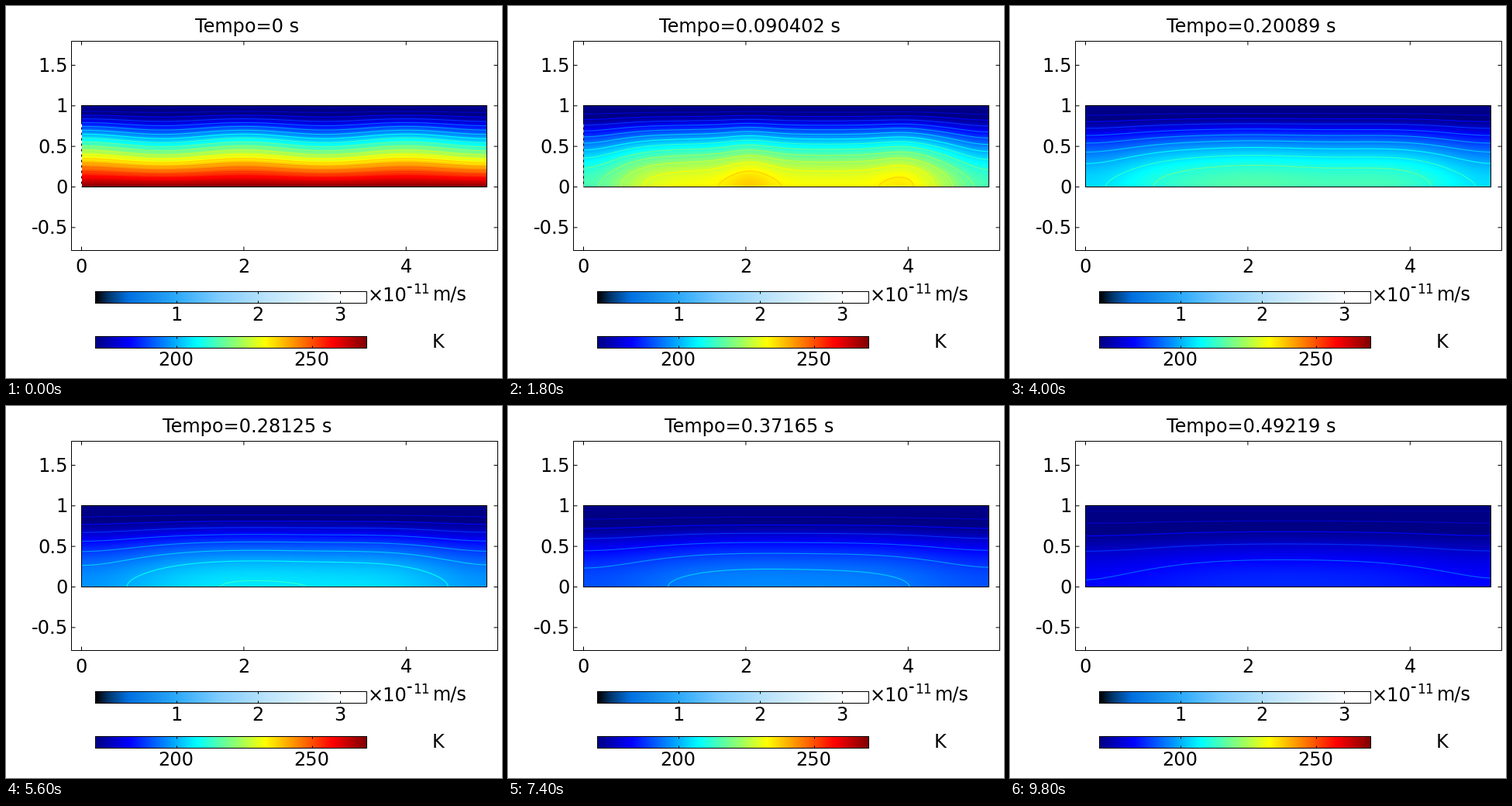
Animation of 640x480 px, one loop 10000 ms. Source, as a matplotlib script:

```python
import numpy as np
import matplotlib.pyplot as plt
from matplotlib.animation import FuncAnimation
from matplotlib.colors import LinearSegmentedColormap
from matplotlib.patches import Rectangle

FRAMES, INTERVAL = 50, 200
DT = 9 / 896                       # seconds of simulated time per frame
T_TOP, T_BOTTOM = 157.0, 270.0     # initial temperatures, K
C_MIN, C_MAX = 170.0, 270.0        # colour range of the surface
X0, Y0, SCALE = 97.5, 233.5, 104.7  # pixel position of the origin, px per unit
LENGTH = 5.0

rainbow = LinearSegmentedColormap.from_list("rainbow", [
    (0, (0, 0, 0.52)), (0.125, (0, 0, 1)), (0.375, (0, 1, 1)),
    (0.625, (1, 1, 0)), (0.875, (1, 0, 0)), (1, (0.5, 0, 0))], N=512)
aurora = LinearSegmentedColormap.from_list("aurora", [
    (0, "#000000"), (0.05, "#003870"), (0.12, "#0070e0"), (0.3, "#2caafa"),
    (0.45, "#7ccbff"), (0.62, "#b8e2fb"), (0.8, "#e6f5fd"), (0.92, "#ffffff"),
    (1, "#ffffff")], N=512)

plt.rcParams["font.family"] = "DejaVu Sans"
fig = plt.figure(figsize=(6.4, 4.8), dpi=100, facecolor="white")
ax = fig.add_axes([0, 0, 1, 1])
ax.axis("off")


def px(x):
    return X0 + SCALE * x


def py(y):
    return Y0 - SCALE * y


def label(x, y, text, ha="center", size=24, **kw):
    return ax.text(x, y, text, ha=ha, va="baseline", fontsize=size * 0.72,
                   color="black", **kw)


# Coordinates ending in .5 are pixel centres, so snapping stays off.
def line(xs, ys, width=0.72, color="black", **kw):
    return ax.plot(xs, ys, color=color, lw=width, snap=False,
                   solid_capstyle="butt", **kw)[0]


def box(left, top, right, bottom, zorder=4):
    ax.add_patch(Rectangle((left, top), right - left, bottom - top, fill=False,
                           ec="black", lw=0.72, snap=False, zorder=zorder))


def colorbar(top, cmap, ticks):
    ramp = np.linspace(0, 1, 350)[None, :]
    ax.imshow(ramp, cmap=cmap, extent=(115, 466, top + 15.5, top - 0.5),
              aspect="auto", interpolation="nearest")
    box(115.5, top, 465.5, top + 15)
    for x, text in ticks:
        line([x, x], [top, top + 3], zorder=5)
        line([x, x], [top + 12, top + 15], zorder=5)
        label(x - 0.8, top + 37.5, text)


# ---- temperature field ----
xs = np.linspace(0, LENGTH, 525)
ys = np.linspace(1, 0, 106)
gx, gy = np.meshgrid(xs, ys)
odd = 2 * np.arange(40) + 1
modes = np.cos(np.outer(ys, odd) * np.pi / 2)
weights = 8 / (np.pi * odd) ** 2


def ease(u):
    u = min(max(u, 0.0), 1.0)
    return u * u * (3 - 2 * u)


def spread(center, s):
    return np.exp(-(xs - center) ** 2 / s)


def gain(t):
    """Change of the slowest vertical mode along x: cold ends, two warm spots."""
    ramp = ease(t / 0.08)
    g = 1 - 0.01 * ramp + 0.15 * t
    s = max(0.2, 2.6 * (t + 0.058))
    loss = ramp * 0.2574 / np.sqrt(np.pi * s)
    g = g - loss * (spread(0, s) + spread(LENGTH, s))
    s = max(0.11, 0.11 + 4 * (t - 0.0904))
    warm = ramp * np.sqrt(0.11 / s)
    return g + warm * (0.072 * spread(2.05, s) + 0.048 * spread(3.95, s))


def field(t):
    decay = weights * np.exp(-(odd * np.pi / 2) ** 2 * t)
    profile = modes @ decay
    u = profile[:, None] + decay[0] * np.outer(modes[:, 0], gain(t) - 1)
    u += (0.03 * np.exp(-2 * np.pi ** 2 * t)
          * np.cos(np.pi * gx) * np.sin(np.pi * gy))
    return T_TOP + (T_BOTTOM - T_TOP) * u


levels = T_TOP + (T_BOTTOM - T_TOP) * (np.arange(20) + 0.5) / 20

# ---- fixed parts ----
surface = ax.imshow(field(0), cmap=rainbow, vmin=C_MIN, vmax=C_MAX,
                    extent=(97, 621, 234, 128),
                    aspect="auto", interpolation="bilinear", zorder=1)
box(px(0), 128.5, 620.5, py(0))

L, R, TOP, BOTTOM = 84.5, 634.5, 45.5, 315.5
box(L, TOP, R, BOTTOM)
for v in (0, 2, 4):
    line([px(v)] * 2, [TOP, TOP + 5])
    line([px(v)] * 2, [BOTTOM - 5, BOTTOM])
    label(px(v), 344, str(v))
for v in (-0.5, 0, 0.5, 1, 1.5):
    line([L, L + 5], [py(v)] * 2)
    line([R - 5, R], [py(v)] * 2)
    label(80, py(v) + 8.5, f"{v:g}", ha="right")

colorbar(368.5, aurora, [(220.5, "1"), (325.5, "2"), (431.5, "3")])
colorbar(426.5, rainbow, [(220.5, "200"), (395.5, "250")])
label(467, 381, "×10", ha="left")
label(516.5, 368, "-", ha="left", size=18, weight="bold")
label(525, 371, "11", ha="left", size=17)
label(550.5, 380, "m/s", ha="left")
label(550, 441, "K", ha="left")

title = label(311.5, 34, "")
edge = line([px(0)] * 2, [py(0), py(0.8)], 0.72, color="white",
            linestyle=(0, (4, 3)), zorder=5)
ax.set_xlim(0, 640)
ax.set_ylim(480, 0)

lines = []


def update(k):
    t = k * DT
    temp = field(t)
    surface.set_data(temp)
    while lines:
        lines.pop().remove()
    lines.append(ax.contour(px(gx), py(gy), temp, levels=levels, cmap=rainbow,
                            vmin=T_TOP, vmax=T_BOTTOM, linewidths=0.8,
                            zorder=2))
    title.set_text(f"Tempo={t:.5g} s")
    edge.set_alpha(max(0.0, 1 - k / 20))
    return []


anim = FuncAnimation(fig, update, frames=FRAMES, interval=INTERVAL,
                     repeat=True, repeat_delay=0, blit=False)
plt.show()
```
